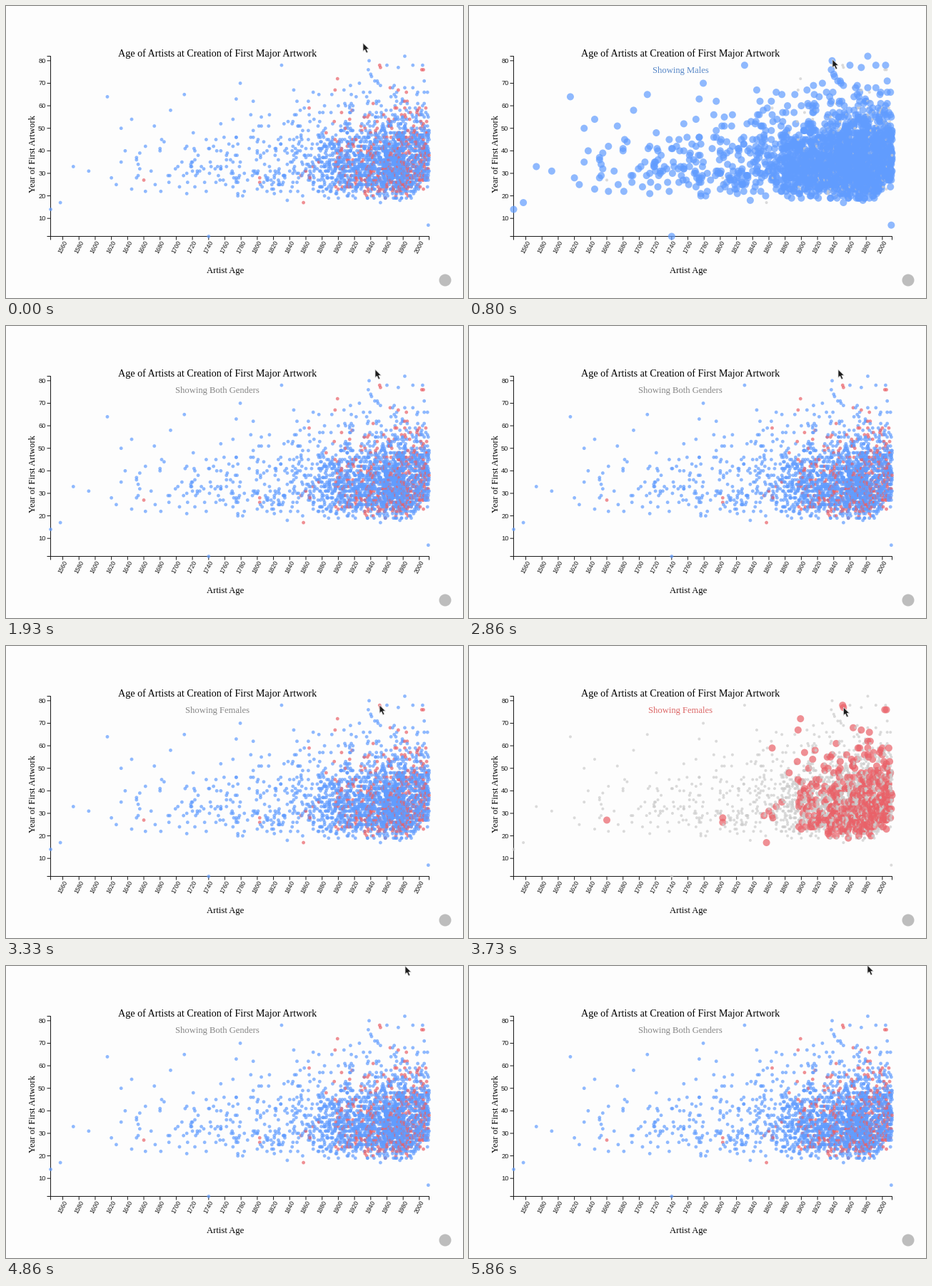
A matplotlib script for the animation above (6.6 s loop, 640 by 410 pixels).

```python
import matplotlib.pyplot as plt
import numpy as np
from matplotlib.animation import FuncAnimation
from matplotlib.colors import to_rgb

W, H, DPI = 640, 410, 80
PT = 72 / DPI                       # points per pixel
FRAMES, INTERVAL = 100, 66
FADE = 6.5                          # length of a transition, in frames

LEFT, RIGHT, TOP, BOTTOM = 62.5, 592.5, 70.5, 323.5
TICK = 5


def rgb(name):
    return np.array(to_rgb(name))


BLUE, RED, PALE = rgb("#619cff"), rgb("#ea6168"), rgb("#cccccc")
CAPTION_GREY = rgb("#888888")

# hover start, hover end, female?, caption, caption colour
HOVERS = [(4, 20, False, "Showing Males", rgb("#5888c8")),
          (50, 64, True, "Showing Females", rgb("#dd6868"))]

# cursor stops: frame, x, y of the tip
STOPS = np.array([(1, 500, 52), (5, 509, 75), (18, 509, 75), (28, 517, 61),
                  (43, 517, 61), (51, 524, 86), (63, 525, 86), (73, 559, 0),
                  (75, 558, -1)])
ARROW = np.array([(0, 0), (0, 11.5), (2.6, 9.2), (4.7, 13.8), (6.8, 12.9),
                  (4.8, 8.4), (8.3, 8.3)])

# the few painters who stand apart, as (year, age)
LONE_MEN = [(1545, 14), (1557, 17), (1573, 33), (1592, 31), (1615, 64),
            (1710, 65), (1740, 2), (1938, 80), (1982, 82), (2011, 7)]
LONE_WOMEN = [(1660, 27), (1803, 28), (1803, 26), (1857, 17), (1952, 77),
              (2005, 76)]


def px(year):
    return LEFT + (year - 1545) * (RIGHT - LEFT) / 467


def py(age):
    return BOTTOM - (age - 2) * (BOTTOM - TOP) / 80


def crowd(rng, lone, years, totals, scale):
    """People whose running total passes through the given years."""
    n = totals[-1]
    year = np.round(np.interp(rng.random(n) * n, totals, years))
    youngest = 16 + 0.3 * np.maximum(0, year - 1990)
    age = np.minimum(np.round(youngest + rng.gamma(4, scale, n)), 78)
    return np.vstack([lone, np.column_stack([year, age])])


def ease(u):
    u = min(max(u, 0), 1)
    return 4 * u**3 if u < 0.5 else 1 - 4 * (1 - u)**3


def mix(a, b, w):
    return a + (b - a) * w


rng = np.random.default_rng(12)
men = crowd(rng, LONE_MEN, [1618, 1710, 1800, 1840, 1875, 1900, 1935, 1955, 1980, 2012],
            [0, 38, 118, 195, 295, 460, 800, 1060, 1600, 2060], 5)
women = crowd(rng, LONE_WOMEN, [1850, 1895, 1935, 1970, 2012], [0, 12, 75, 205, 425], 4.8)
people = np.vstack([men, women])
female = np.arange(len(people)) >= len(men)
order = np.lexsort((rng.random(len(people)), people[:, 0]))
people, female = people[order], female[order]
hues = np.where(female[:, None], RED, BLUE)

fig = plt.figure(figsize=(W / DPI, H / DPI), dpi=DPI, facecolor="#fdfdfd")
ax = fig.add_axes([0, 0, 1, 1])
ax.set(xlim=(0, W), ylim=(H, 0))
ax.axis("off")


def line(xs, ys):
    ax.plot(xs, ys, color="#1a1a1a", lw=PT, solid_capstyle="butt",
            solid_joinstyle="miter", snap=False, zorder=1)


def text(x, y, s, size, font="Liberation Serif", **kw):
    kw = {"ha": "center", "va": "baseline", "color": "black", "zorder": 4, **kw}
    return ax.text(x, y, s, fontsize=size * PT, family=font, **kw)


line([LEFT - TICK, LEFT, LEFT, LEFT - TICK], [TOP, TOP, BOTTOM, BOTTOM])
line([LEFT, LEFT, RIGHT, RIGHT], [BOTTOM + TICK, BOTTOM, BOTTOM, BOTTOM + TICK])
for age in range(10, 81, 10):
    y = py(age)
    line([LEFT - TICK, LEFT], [y, y])
    text(55.5, y + 3, str(age), 9.3, "Liberation Sans", ha="right", color="#1a1a1a")
for year in range(1560, 2001, 20):
    x = px(year)
    line([x, x], [BOTTOM, BOTTOM + TICK])
    text(x, 338.5, str(year), 8.6, "Liberation Sans", va="center", rotation=62,
         color="#1a1a1a")

text(296.5, 70.8, "Age of Artists at Creation of First Major Artwork", 14.15)
text(307, 374.6, "Artist Age", 12.6)
text(41, 207.8, "Year of First Artwork", 12.6, rotation=90, rotation_mode="anchor")
caption = text(296.3, 94.3, "", 12.6)

ax.add_patch(plt.Circle((615, 385), 8.5, fc="#bdbdbd", ec="none", zorder=4))
dots = ax.scatter(px(people[:, 0]), py(people[:, 1]), s=10, c=hues, alpha=0.7,
                  linewidths=0, zorder=2)
cursor = plt.Polygon(ARROW, closed=True, fc="#1c1c1c", ec="#d8d8d8",
                     lw=0.8 * PT, zorder=6)
ax.add_patch(cursor)


def update(k):
    label, hue, weight, chosen = "", CAPTION_GREY, 0, female
    for start, end, is_female, name, colour in HOVERS:
        if k >= start:
            label = name if k < end else "Showing Both Genders"
            hue, chosen = colour, female == is_female
            weight = ease((k - start) / FADE) - ease((k - end) / FADE)

    radius = np.where(chosen, mix(2.4, 5, weight), mix(2.4, 2, weight))
    dots.set_sizes((2 * radius * PT) ** 2)
    dots.set_facecolor(np.where(chosen[:, None], hues, mix(hues, PALE, weight)))
    caption.set_text(label)
    caption.set_color(mix(CAPTION_GREY, hue, weight))

    tip = [np.interp(k, STOPS[:, 0], STOPS[:, i]) for i in (1, 2)]
    cursor.set_xy(ARROW + tip)
    return dots, caption, cursor


anim = FuncAnimation(fig, update, frames=FRAMES, interval=INTERVAL,
                     repeat=True, repeat_delay=0, blit=False)
plt.show()
```
